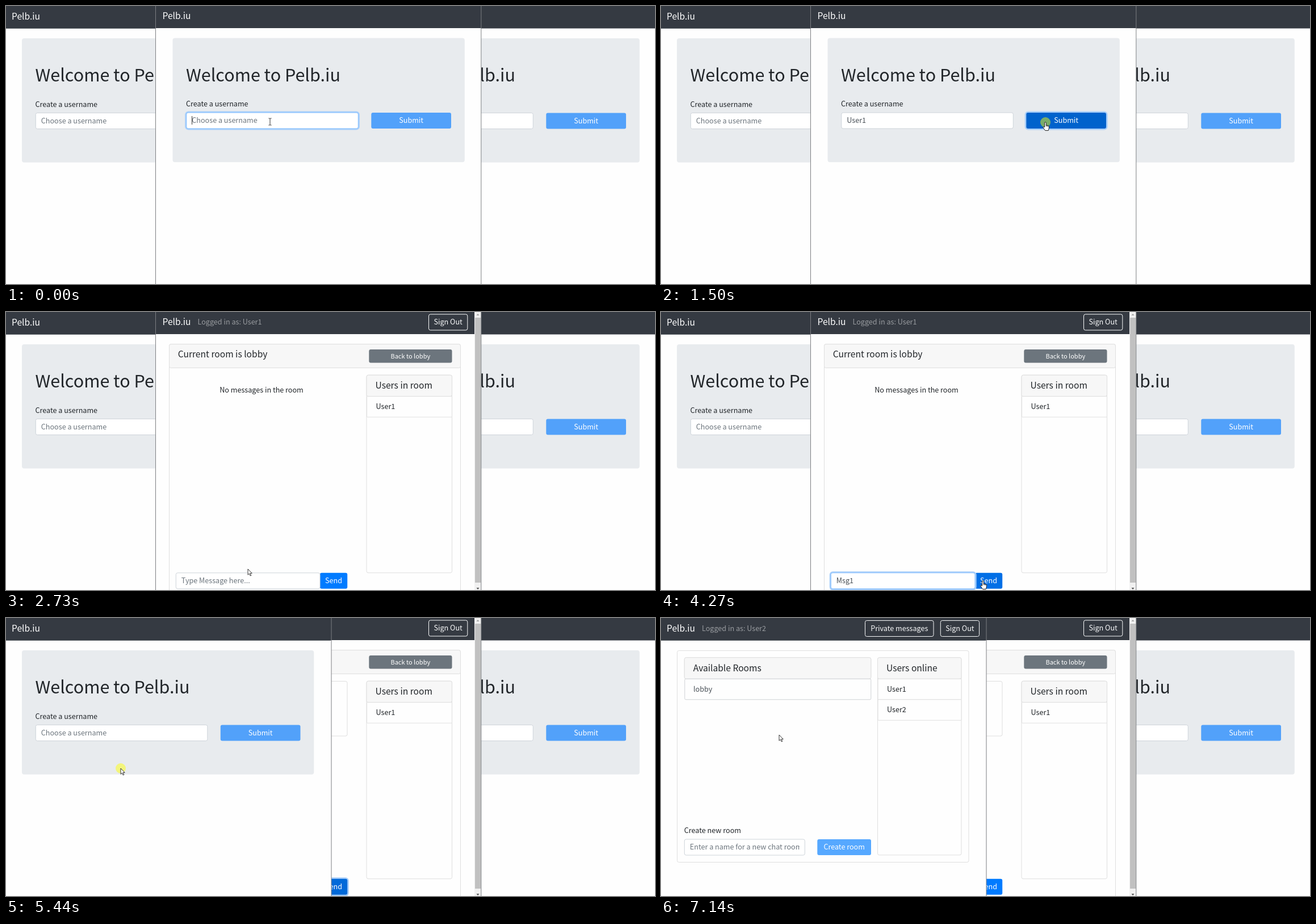
An HTML page that plays this animation: 1143 px wide and 490 px high, repeating every 8000 ms.

```html
<!DOCTYPE html>
<html lang="en">
<head>
<meta charset="utf-8">
<title>Chat rooms</title>
<style>
html, body { margin: 0; width: 100%; height: 100%; overflow: hidden; background: #fefefe; }
svg { display: block; }
text { font-family: "Noto Sans CJK JP", "Noto Sans CJK SC", "Noto Sans", sans-serif; }
</style>
</head>
<body>
<svg id="stage" width="1143" height="490" viewBox="0 0 1143 490"></svg>
<script>
const LOOP = 8000;
const BRAND = 'Pelb.iu';
const BASE = 12.6, HEAD = 15.6;
const INK = '#212529', MUTED = '#6c757d', FIELD = '#495057', LINE = '#dfdfdf';
const BLUE = '#007bff', HOVER = '#0069d9', PRESSED = '#0062cc';
const FAMILY = '"Noto Sans CJK JP", "Noto Sans CJK SC", "Noto Sans", sans-serif';

const stage = document.getElementById('stage');
const pen = document.createElement('canvas').getContext('2d');
const widthOf = str => {
  pen.font = `${BASE}px ${FAMILY}`;
  return pen.measureText(str).width;
};

// Drawing helpers
const text = (x, y, str, fill = INK, size = BASE, anchor = 'start') =>
  `<text x="${x}" y="${y}" font-size="${size}" fill="${fill}" text-anchor="${anchor}">${str}</text>`;
const box = (x, y, w, h, fill, stroke = 'none', r = 3) =>
  `<rect x="${x}" y="${y}" width="${w}" height="${h}" rx="${r}" fill="${fill}" stroke="${stroke}"/>`;
const rule = (x, y, w) => `<path d="M${x} ${y}h${w}" stroke="${LINE}"/>`;
const shift = (x, y, body) => `<g transform="translate(${x} ${y})">${body}</g>`;
const ring = (x, y, w, h) =>
  `<rect x="${x - 1.2}" y="${y - 1.2}" width="${w + 2.4}" height="${h + 2.4}" rx="4.5" fill="none" stroke="#a9cffa" stroke-width="2.8"/>`;

function button(x, y, w, str, fill, focus) {
  return (focus ? ring(x, y, w, 28) : '') + box(x, y, w, 28, fill) +
    text(x + w / 2, y + 18, str, '#fff', BASE, 'middle');
}

function outlined(x, w, str) {
  return box(x, 4.5, w, 28, 'none', '#f8f9fa') +
    text(x + w / 2, 22.8, str, '#f8f9fa', BASE, 'middle');
}

function field(x, y, w, hint, { value = '', focus = false, caret = false } = {}) {
  const at = x + 9.8;
  const body = value ? text(9.5, 18, value, FIELD) : text(9.5, 18, hint, MUTED);
  return (focus ? ring(x, y, w, 28) : '') +
    box(x, y, w, 28, '#fff', focus ? '#80bdff' : '#ced4da') +
    `<svg x="${x}" y="${y}" width="${w - 9.5}" height="28">${body}</svg>` +
    (caret ? `<path d="M${at + widthOf(value)} ${y + 6}v15" stroke="#333"/>` : '');
}

function panel(x, y, w, h, title) {
  return box(x, y, w, h, '#fefefe', LINE) + box(x, y, w, 37.5, '#f7f7f7', LINE) +
    text(x + 15.5, y + 24, title, INK, HEAD);
}

function userRows(x, y, w, users) {
  return users.map((name, i) =>
    box(x + .5, y + i * 36.5, w - .5, 36.5, '#fefefe', LINE, 1) +
    text(x + 16.5, y + i * 36.5 + 22.5, name)).join('');
}

function nav(w, user) {
  return `<rect width="${w}" height="39.5" fill="#353a42"/>` + text(10, 23.5, BRAND, '#fff', HEAD) +
    (user ? text(72, 22.8, 'Logged in as: ' + user, '#999ca0') : '');
}

// Pages, in window coordinates
function login({ input, fill = '#52a1fa', pressed = false } = {}) {
  return nav(571.5) + box(28, 57, 514.3, 218.8, '#e8ebee', 'none', 4) +
    text(51.5, 133, 'Welcome to ' + BRAND, INK, 30.5) +
    text(51.5, 177.7, 'Create a username') +
    field(52.3, 188.5, 302.5, 'Choose a username', input) +
    button(377.8, 188.5, 140.7, 'Submit', fill, pressed);
}

function lobby(user, users, hover) {
  return nav(571.5, user) + outlined(359.5, 120.5, 'Private messages') + outlined(492.3, 68.2, 'Sign Out') +
    box(28.5, 57.5, 513.5, 373, '#fefefe', LINE) +
    panel(41.3, 69.8, 328.5, 37.5, 'Available Rooms') +
    box(41.8, 107.3, 328, 36.5, hover ? '#f8f9fa' : '#fefefe', '#cfd2d5', 2) +
    text(57, 129.8, 'lobby', FIELD) +
    panel(381.5, 69.8, 147.5, 348, 'Users online') + userRows(381.5, 107.3, 147.5, users) +
    text(40.8, 379.2, 'Create new room') +
    field(41.3, 390, 212, 'Enter a name for a new chat room') +
    button(275.3, 390, 94.7, 'Create room', '#56a8ff');
}

// Room page, in stage coordinates
function room({ input, sent, fill, sendFocus }) {
  const talk = sent
    ? box(299.5, 111.5, 301.5, 96.5, '#fefefe', LINE) +
      text(315, 138, 'User1', INK, HEAD) + text(315, 168, 'Msg1')
    : text(450, 142.2, 'No messages in the room', INK, BASE, 'middle');
  return shift(265.5, -.5, nav(560, 'User1') + outlined(479, 68.3, 'Sign Out')) +
    box(287.5, 56.7, 513, 460, '#fefefe', LINE) + box(287.5, 56.7, 513, 41.8, '#f7f7f7', LINE) +
    text(302.7, 80, 'Current room is lobby', INK, HEAD) +
    box(639.3, 66, 146.2, 23.5, MUTED) +
    text(712.3, 81.8, 'Back to lobby', '#fff', 11, 'middle') + talk +
    panel(635, 111.2, 150.5, 348.5, 'Users in room') + userRows(635, 148.7, 150.5, ['User1']) +
    (sendFocus ? '' : button(553, 459.8, 48.2, 'Send', fill)) +
    field(299.3, 459.8, 253.7, 'Type Message here...', input) +
    (sendFocus ? button(553, 459.8, 48.2, 'Send', fill, true) : '') +
    '<rect x="825" width="12" height="490" fill="#f1f1f1"/>' +
    '<rect x="826" y="10" width="10.5" height="467" fill="#c1c1c1"/>' +
    '<path d="M828.5 6l2.5-3 2.5 3z" fill="#a3a3a3"/><path d="M828.5 486l2.5 3 2.5-3z" fill="#505050"/>';
}

// Latest entry whose time has passed
const latest = (table, t) => table.filter(row => row[0] <= t).pop()[1];

const NAME_1 = [[0, ''], [320, 'U'], [380, 'Us'], [540, 'Use'], [620, 'User'], [700, 'User1']];
const NAME_2 = [[0, ''], [6075, 'Us'], [6150, 'User2']];
const MESSAGE = [[0, ''], [3250, 'M'], [3340, 'Ms'], [3490, 'Msg'], [3650, 'Msg1'], [4430, '']];

// Pointer: first step, last step, number of steps, end point
const START = [465, 204];
const MOVES = [
  [780, 1250, 7, 677, 205],
  [1650, 1880, 4, 477, 140],
  [1980, 2140, 3, 472, 135],
  [2420, 2730, 5, 426, 453],
  [2820, 2820, 1, 425, 465],
  [3870, 4270, 6, 567, 474],
  [4730, 5190, 7, 202, 265],
  [5520, 5840, 5, 209, 222],
  [6000, 6000, 1, 208, 206]
];
const SHAPES = [[0, 'beam'], [1570, 'arrow'], [1810, 'hand'], [2200, 'arrow'], [2820, 'beam'],
  [4190, 'hand'], [4730, 'arrow'], [6000, 'beam'], [7140, 'arrow']];
const CLICKS = [[1350, 1570], [2140, 2200], [4360, 4500], [5440, 5520]];
const within = (t, a, b) => t >= a && t < b;

function pointerAt(t) {
  let [x, y] = START;
  for (const [from, to, n, ex, ey] of MOVES) {
    if (t < from) break;
    const k = t >= to ? n : Math.floor((t - from) / (to - from) * (n - 1)) + 1;
    const p = k / n, e = p * p * (3 - 2 * p);
    x += (ex - x) * e;
    y += (ey - y) * e;
  }
  let shape = latest(SHAPES, t);
  if (t < 1570 && x > 621) shape = x > 643 ? 'hand' : 'arrow';
  return { x, y, shape };
}

const GLYPHS = {
  beam: '<path d="M-2.5-6h2l.5.6.5-.6h2M0-5.4V5.4M-2.5 6h2l.5-.6.5.6h2" fill="none" stroke="#333"/>',
  arrow: '<path d="M0 0V10.3L2.4 8.1 4.2 12 5.8 11.3 4.1 7.5H7.2Z" fill="#fff" stroke="#222" stroke-width=".9"/>',
  hand: '<path d="M-1.4 8.5V1a1.3 1.3 0 0 1 2.6 0V5l4.1 1q1.3.4 1.2 1.9L6 11.6 5.2 14.5H-.4L-3.8 9.6q-.8-1.6.6-1.8Z" fill="#fff" stroke="#222"/>' +
    '<path d="M1.2 5v2.4M3 5.6v2M4.8 6v2" stroke="#222" stroke-width=".8"/>'
};

function pointer(t, { x, y, shape }) {
  const halo = CLICKS.some(([a, b]) => within(t, a, b));
  return shift(x, y, (halo ? '<circle r="9" fill="#ff0" fill-opacity=".48"/>' : '') + GLYPHS[shape]);
}

function middleWindow(t, p) {
  let page;
  if (t < 1570) {
    const value = latest(NAME_1, t), pressed = t >= 1350;
    const fill = !value ? '#52a1fa' : pressed ? PRESSED : p.x > 643 ? HOVER : BLUE;
    const caret = t < 1250 && !within(t, 70, 160);
    page = shift(265.5, -.5, login({ input: { value, focus: !pressed, caret }, fill, pressed }));
  } else if (t < 2200) {
    const hover = p.x < 635 && p.y < 144;
    page = shift(265.5, -.5, lobby('User1', ['User1'], hover));
  } else {
    const focus = within(t, 2970, 4360), sendFocus = within(t, 4360, 5520);
    const hover = within(t, 4190, 4360);
    page = room({
      input: { value: latest(MESSAGE, t), focus, caret: within(t, 3030, 4190) },
      sent: t >= 4430,
      fill: sendFocus ? HOVER : hover ? '#006fe6' : BLUE,
      sendFocus
    });
  }
  return '<rect x="263" width="574" height="490" fill="#fefefe"/><rect x="263" width="574" height="39" fill="#353a42"/>' +
    page + '<path d="M263.5 0V490M836.8 0V490" stroke="#7d7f82"/>';
}

function leftWindow(t) {
  const focus = t >= 6000, value = latest(NAME_2, t);
  const page = t >= 7140
    ? lobby('User2', ['User1', 'User2'])
    : login({ input: { value, focus, caret: focus && t < 6670 }, fill: value ? BLUE : '#52a1fa' });
  return '<rect width="573" height="490" fill="#fefefe"/><rect width="573" height="39.5" fill="#353a42"/>' +
    page + '<path d="M573 0V490" stroke="#7d7f82"/>';
}

const rightWindow = '<rect x="573" width="570" height="490" fill="#fefefe"/>' + shift(573.5, 0, login());

function scene(t) {
  const p = pointerAt(t);
  const pair = [leftWindow(t), middleWindow(t, p)];
  if (t >= 5440) pair.reverse();
  return rightWindow + pair.join('') + pointer(t, p);
}

const began = performance.now();
let shown = '';
function tick() {
  const next = scene((performance.now() - began) % LOOP);
  if (next !== shown) stage.innerHTML = shown = next;
  requestAnimationFrame(tick);
}
tick();
</script>
</body>
</html>
```
